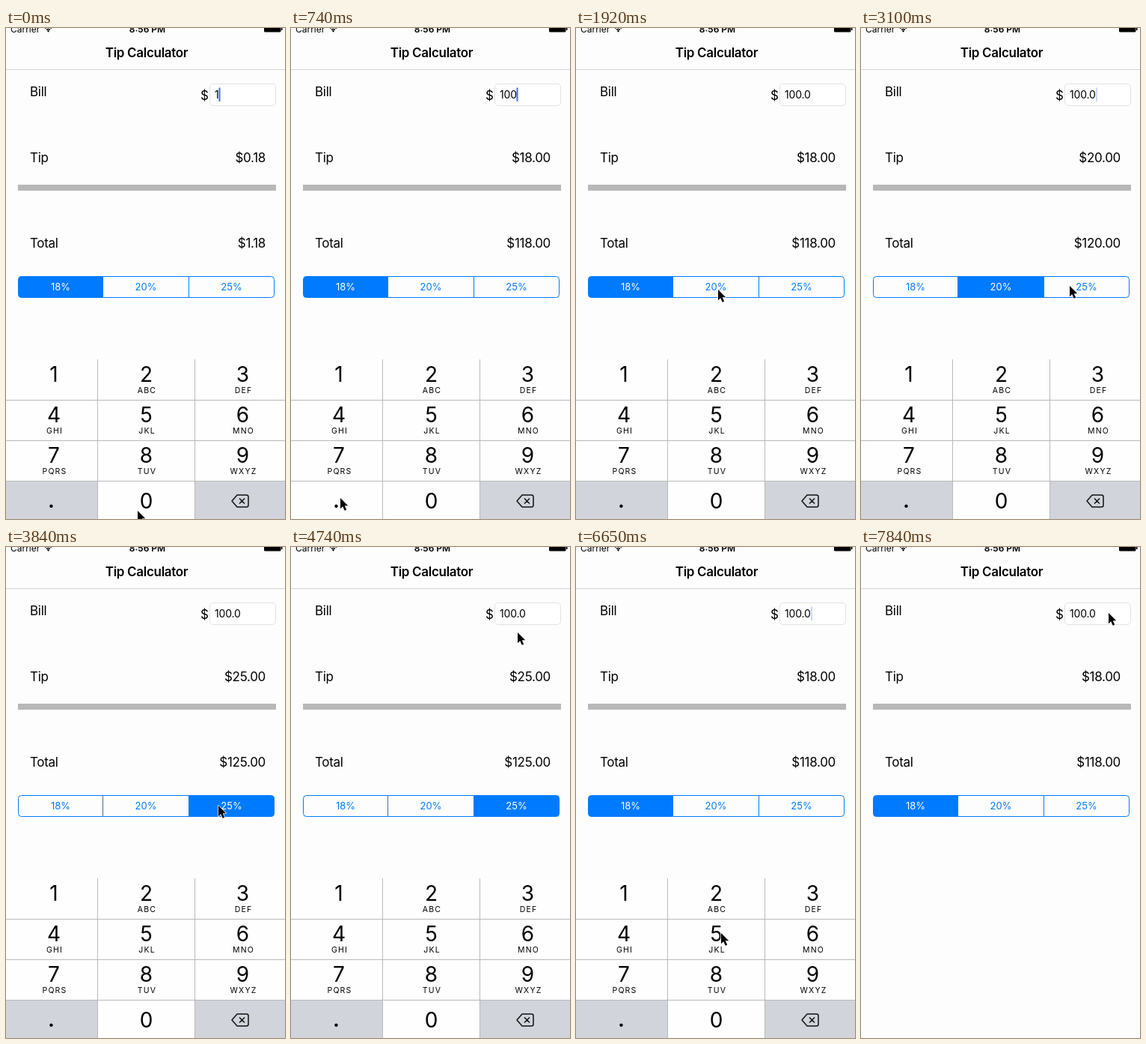
Animation, 373 px wide and 655 px high, one loop 7990 ms. Source, as an HTML page:

```html
<!DOCTYPE html>
<html lang="en">
<head>
<meta charset="utf-8">
<title>Tip Calculator</title>
<style>
  html, body { margin: 0; width: 100%; height: 100%; overflow: hidden; background: #fdfdfd; }
  svg { display: block; width: 100vw; height: 100vh; font-family: Inter, Roboto, sans-serif; }
</style>
</head>
<body>
<svg id="stage" viewBox="0 0 373 655"></svg>
<script>
const NS = 'http://www.w3.org/2000/svg';
const stage = document.getElementById('stage');
const BLUE = '#007aff', GREY = '#d1d4db', WHITE = '#fefefe', LINE = '#b9b9b9';
const LOOP = 7990, STEPS = 54;

function add(parent, tag, attrs, text) {
  const el = document.createElementNS(NS, tag);
  set(el, attrs);
  if (text !== undefined) el.textContent = text;
  parent.appendChild(el);
  return el;
}
function set(el, attrs) {
  for (const name in attrs) el.setAttribute(name, attrs[name]);
}
const group = (parent = stage) => add(parent, 'g', {});
const rect = (parent, x, y, width, height, fill, more) =>
  add(parent, 'rect', { x, y, width, height, fill, ...more });
const path = (parent, d, more) => add(parent, 'path', { d, fill: 'none', ...more });
const label = (parent, text, x, y, size, anchor = 'start', more) =>
  add(parent, 'text', { x, y, 'font-size': size, 'text-anchor': anchor, ...more }, text);
const tight = { 'letter-spacing': -0.3 };

// Status and navigation bars
rect(stage, 0, 0, 373, 655, '#fdfdfd');
label(stage, 'Carrier', 6, 5.5, 12);
path(stage, 'M52 0.5Q56.5 -3 61 0.5M54 2.3Q56.5 0.5 59 2.3', { stroke: '#000', 'stroke-width': 1.5 });
path(stage, 'M54.8 3.7Q56.5 2.4 58.2 3.7L56.5 5.8Z', { fill: '#000' });
label(stage, '8:56 PM', 189, 5.5, 12, 'middle', { 'font-weight': 600 });
rect(stage, 345, -4, 22.5, 9.5, '#000', { rx: 1.5 });
rect(stage, 368, -1, 1.5, 4, '#000');
label(stage, 'Tip Calculator', 188, 39, 17, 'middle', { 'font-weight': 600, ...tight });
path(stage, 'M0 55.5H373', { stroke: '#d2d2d2' });

// Amounts
label(stage, 'Bill', 32, 90.5, 17, 'start', tight);
label(stage, 'Tip', 32, 178.5, 17, 'start', tight);
label(stage, 'Total', 32, 292.5, 17, 'start', tight);
label(stage, '$', 260, 95.5, 17);
rect(stage, 272.5, 74.5, 88, 29, '#fff', { rx: 4.5, stroke: '#e2e2e2' });
const billText = label(stage, '', 279, 94, 14, 'start', { 'letter-spacing': -0.15 });
const tipText = label(stage, '', 347, 178.5, 17, 'end', tight);
const totalText = label(stage, '', 347, 292.5, 17, 'end', tight);
const caret = rect(stage, 0, 79.5, 2, 18.5, '#426bf2', { rx: 0.5 });
rect(stage, 16, 209, 345, 8, '#b8b8b8');

// Rate selector
const rates = [18, 20, 25];
const edges = [16.5, 129.5, 244.5, 358.5];
const segShapes = [
  'M129.5 331.5H20.5a4 4 0 0 0 -4 4V355.5a4 4 0 0 0 4 4H129.5Z',
  'M129.5 331.5H244.5V359.5H129.5Z',
  'M244.5 331.5H354.5a4 4 0 0 1 4 4V355.5a4 4 0 0 1 -4 4H244.5Z'
];
const segments = rates.map((rate, i) => ({
  shape: path(stage, segShapes[i], { stroke: BLUE }),
  text: label(stage, rate + '%', (edges[i] + edges[i + 1]) / 2, 350, 13, 'middle')
}));
const divider = path(stage, 'M129.5 332V359', { stroke: '#45688f' });

// Keypad
const pad = group();
const cols = [0, 122.5, 252.5, 373];
const centers = [64, 187.5, 316.5];
const letters = ['', 'ABC', 'DEF', 'GHI', 'JKL', 'MNO', 'PQRS', 'TUV', 'WXYZ'];
const key = (col, row, fill) =>
  rect(pad, cols[col], 442 + row * 54, cols[col + 1] - cols[col], 54, fill);
rect(pad, 0, 442, 373, 213, WHITE);
const dotKey = key(0, 3, GREY), zeroKey = key(1, 3, WHITE);
key(2, 3, GREY);
path(pad, 'M122.5 442V655M252.5 442V655M0 496.5H373M0 550.5H373M0 604.5H373', { stroke: LINE });
letters.forEach((text, i) => {
  const x = centers[i % 3], y = 472 + Math.floor(i / 3) * 54;
  label(pad, i + 1, x, y, 28, 'middle');
  label(pad, text, x + 1, y + 15, 10.5, 'middle', { 'letter-spacing': 1.2 });
});
label(pad, '.', 60.5, 640, 28, 'middle', { 'font-weight': 600 });
label(pad, '0', 187.5, 641, 28, 'middle');
path(pad, 'M309 623H321.5a2.5 2.5 0 0 1 2.5 2.5V636.5a2.5 2.5 0 0 1 -2.5 2.5H309L302 631Z' +
  'M312 627.5L319 634.5M319 627.5L312 634.5',
  { stroke: '#111', 'stroke-width': 1.5, 'stroke-linejoin': 'round' });

// Edit menu
const menu = group();
rect(menu, 195, 25, 170, 36, '#262626', { rx: 8 });
path(menu, 'M305 60.5H324L314.5 70Z', { fill: '#262626' });
path(menu, 'M269.5 25V61', { stroke: '#6c6c6c' });
label(menu, 'Select', 232.5, 48, 14, 'middle', { fill: '#fff', 'letter-spacing': -0.1 });
label(menu, 'Select All', 317.5, 48, 14, 'middle', { fill: '#fff', 'letter-spacing': -0.1 });

const pointer = path(stage, 'M0 0V14.2L3.2 11.2L5.7 16.8L8.2 15.7L5.8 10.3H10.2Z', {
  fill: '#000', stroke: '#fff', 'stroke-width': 1.4, 'paint-order': 'stroke', 'stroke-linejoin': 'round'
});

// Pointer stops: step, x, y
const stops = [
  [0, 176, 644], [3, 176, 644], [4, 120, 634], [5, 66, 627], [6, 100, 630], [7, 182, 634],
  [8, 240, 345], [9, 302, 195], [10, 310, 180], [11, 308, 290], [12, 250, 330], [13, 190, 349],
  [14, 187, 346], [18, 187, 346], [20, 262, 344], [21, 279, 344], [26, 284, 345],
  [28, 308, 441], [29, 310, 400], [31, 305, 180], [32, 303, 114], [33, 309, 88], [36, 309, 90],
  [38, 120, 310], [39, 68, 350], [42, 68, 350], [44, 160, 605], [46, 228, 425],
  [47, 232, 410], [50, 232, 410], [52, 320, 110], [53, 331, 88]
];
function pointerAt(step) {
  const i = Math.max(1, stops.findIndex(s => s[0] >= step));
  const [a, x, y] = stops[i - 1], [b, u, v] = stops[i];
  const p = (step - a) / (b - a);
  return [x + (u - x) * p, y + (v - y) * p];
}

const clamp = v => Math.min(1, Math.max(0, v));
const pick = (step, list) => list.filter(item => item[0] <= step).pop()[1];
const bills = [[0, '1'], [2, '10'], [4, '100'], [6, '100.'], [8, '100.0']];
const selections = [[0, 0], [17, 1], [26, 2], [41, 0]];
const touches = { 16: 1, 25: 2, 40: 0 };
const caretX = [284.5, 293, 301.5, 305.5, 314];

function draw(time) {
  const step = Math.floor(time / LOOP * STEPS + 0.1) % STEPS;
  const bill = pick(step, bills), chosen = pick(step, selections);
  const tip = bill * rates[chosen] / 100;
  billText.textContent = bill;
  tipText.textContent = '$' + tip.toFixed(2);
  totalText.textContent = '$' + (+bill + tip).toFixed(2);

  segments.forEach(({ shape, text }, i) => {
    const fill = i === chosen ? BLUE : touches[step] === i ? '#d9ebff' : '#fdfdfd';
    set(shape, { fill });
    set(text, { fill: i === chosen ? '#fff' : BLUE });
  });
  set(divider, { opacity: chosen === 2 ? 1 : 0 });

  const phase = step * LOOP / STEPS / 1000 % 1;
  const blink = Math.min(clamp((phase - 0.06) / 0.18), clamp((0.7 - phase) / 0.15));
  set(caret, {
    x: caretX[bill.length - 1],
    opacity: step < 9 ? 1 : step < 46 ? blink : 0
  });

  set(dotKey, { fill: step === 5 ? WHITE : GREY });
  set(zeroKey, { fill: [1, 3, 7].includes(step) ? GREY : WHITE });
  const slide = 1 - (1 - clamp((step - 48) / 3)) ** 3;
  set(pad, { transform: `translate(0 ${slide * 214})` });

  set(menu, { opacity: step < 35 || step > 40 ? 0 : step === 40 ? 0.5 : 1 });
  set(pointer, { transform: `translate(${pointerAt(step)})` });
}

const start = performance.now();
function tick() {
  draw((performance.now() - start) % LOOP);
  requestAnimationFrame(tick);
}
tick();
</script>
</body>
</html>
```
